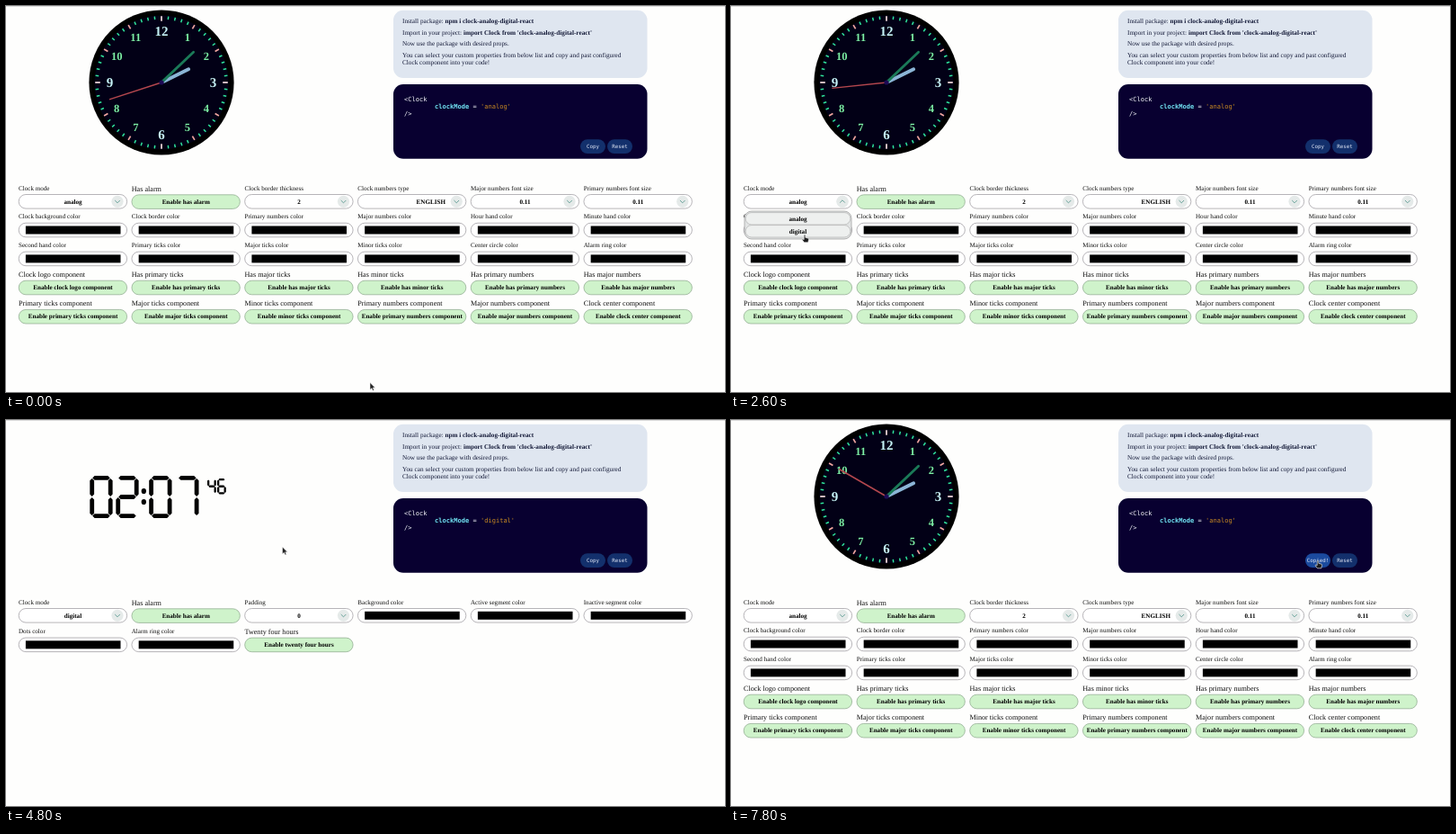
These frames come from a looping animation (800x429 px, 8 s). An HTML page:

```html
<!DOCTYPE html>
<html lang="en">
<head>
<meta charset="utf-8">
<title>Clock playground</title>
<style>
  html, body { margin: 0; width: 100%; height: 100%; overflow: hidden; background: #fefefd; }
  svg { display: block; width: 100vw; height: 100vh; }
  text { font: 7.1px "Liberation Serif", serif; fill: #111; text-rendering: geometricPrecision; white-space: pre; }
  .big { font-size: 8.15px; }
  .bold { font-weight: bold; fill: #000; }
  .mid { text-anchor: middle; }
  .info, .info tspan { font-size: 7.24px; fill: #141a38; }
  .code { font: 7.06px "DejaVu Sans Mono", monospace; fill: #f4f4fa; }
  .key { font-weight: bold; fill: #72e6f5; }
  .str { fill: #cb8b22; }
  .act { font: 5.8px "DejaVu Sans Mono", monospace; fill: #e4eaf8; text-anchor: middle; }
  .major { font-size: 15px; font-weight: bold; fill: #c6f3f6; }
  .minor { font-size: 12.5px; font-weight: bold; fill: #7df0a4; }
</style>
</head>
<body>
<svg id="stage" viewBox="0 0 800 429"></svg>
<script>
const LOOP = 8000, STEP = 200;
const CX = 173, CY = 85;

// ---------- drawing helpers ----------
const rect = (x, y, w, h, r, fill, extra = "") =>
  `<rect x="${x}" y="${y}" width="${w}" height="${h}" rx="${r}" fill="${fill}" ${extra}/>`;
const text = (x, y, cls, content, extra = "") =>
  `<text x="${x}" y="${y}" class="${cls}" ${extra}>${content}</text>`;
const circle = (x, y, r, fill) => `<circle cx="${x}" cy="${y}" r="${r}" fill="${fill}"/>`;
const group = (id, content) => `<g id="${id}">${content}</g>`;
const outline = (color, width = 0.7) => `stroke="${color}" stroke-width="${width}"`;

// ---------- form fields ----------
const colX = col => 14.2 + col * 125.75;

function chevron(x, y, up) {
  const s = up ? -1 : 1;
  return circle(x, y, 6.6, "#e5eae9") +
    `<path d="M${x - 2.8} ${y - 1.3 * s}l2.8 2.8l2.8 -2.8" transform="${up ? `matrix(1 0 0 -1 0 ${2 * y + 2.6})` : ""}" fill="none" ${outline("#5d9b92", 0.9)}/>`;
}

// kind: s = select, b = toggle button, c = colour input
function field(kind, label, value, col, y) {
  const x = colX(col), mid = x + 60.3;
  const pill = rect(x, y - 7.8, 120.4, 15.6, 7.8,
    kind === "b" ? "#cff3cb" : "#fff", outline(kind === "b" ? "#8aa58a" : "#99959b"));
  const caption = kind === "b"
    ? text(x - 0.2, y - 12.1, "big", label)
    : text(x - 0.2, y - 12.6, "", label);
  if (kind === "c") return caption + pill + rect(x + 7.7, y - 4.5, 105.6, 9, 0, "#000");
  const shift = value === "ENGLISH" ? 21 : 0;
  return caption + pill + text(mid + shift, y + 2.2, "bold mid", value) +
    (kind === "s" ? chevron(x + 109.8, y) : "");
}

const select = ([label, value], col, y) => field("s", label, value, col, y);
const colors = (labels, y, from = 0) =>
  labels.split(",").map((name, i) => field("c", name + " color", "", from + i, y)).join("");
const toggles = (labels, y, from = 0) =>
  labels.split(",").map((name, i) =>
    field("b", name, "Enable " + name[0].toLowerCase() + name.slice(1), from + i, y)).join("");

const analogForm =
  select(["Clock mode", "analog"], 0, 217.3) +
  toggles("Has alarm", 217.6, 1) +
  [["Clock border thickness", "2"], ["Clock numbers type", "ENGLISH"],
   ["Major numbers font size", "0.11"], ["Primary numbers font size", "0.11"]]
    .map((f, i) => select(f, i + 2, 217.3)).join("") +
  colors("Clock background,Clock border,Primary numbers,Major numbers,Hour hand,Minute hand", 249) +
  colors("Second hand,Primary ticks,Major ticks,Minor ticks,Center circle,Alarm ring", 280.9) +
  toggles("Clock logo component,Has primary ticks,Has major ticks,Has minor ticks,Has primary numbers,Has major numbers", 313) +
  toggles("Primary ticks component,Major ticks component,Minor ticks component,Primary numbers component,Major numbers component,Clock center component", 345.2);

const digitalForm =
  select(["Clock mode", "digital"], 0, 217.3) +
  toggles("Has alarm", 217.6, 1) +
  select(["Padding", "0"], 2, 217.3) +
  colors("Background,Active segment,Inactive segment", 217.3, 3) +
  colors("Dots,Alarm ring", 249.8) +
  toggles("Twenty four hours", 249.9, 2);

const dropdown =
  chevron(colX(0) + 109.8, 217.3, true) +
  rect(15, 228, 119, 31, 8, "#e2e4e4", outline("#9a9a9a")) +
  ["analog", "digital"].map((name, i) =>
    rect(16.2, 229.6 + 14 * i, 116.6, 13.4, 6.7, "#eef0ef", outline("#a9a9a9", 0.6)) +
    text(74.5, 238.6 + 14 * i, "bold mid", name)).join("");

// ---------- analog clock ----------
function dial() {
  let out = circle(CX, CY, 80.6, "#000") + circle(CX, CY, 74.5, "#020016");
  for (let i = 0; i < 60; i++) {
    const quarter = i % 15 === 0, hour = i % 5 === 0;
    const color = quarter ? "#f6dede" : hour ? "#f2a6a0" : "#2fe39b";
    out += `<path d="M${CX} ${CY - 73.8}v${quarter ? 5.6 : hour ? 5 : 3.6}" transform="rotate(${i * 6} ${CX} ${CY})" ${outline(color, hour ? 1.7 : 1.5)}/>`;
  }
  for (let n = 1; n <= 12; n++) {
    const a = n * Math.PI / 6, major = n % 3 === 0;
    out += text(CX + 57.5 * Math.sin(a), CY - 57.5 * Math.cos(a) + (major ? 5 : 4.2),
      (major ? "major" : "minor") + " mid", n);
  }
  return out;
}
const hand = (id, angle, from, to, color, width, cap) =>
  `<path id="${id}" d="M${CX} ${CY - from}V${CY - to}" transform="rotate(${angle} ${CX} ${CY})" stroke-linecap="${cap}" ${outline(color, width)}/>`;

const analogClock = dial() +
  hand("hour", 63.9, 3, 33.5, "#8bb5d6", 4, "round") +
  hand("minute", 46.6, 2, 49, "#1b7a58", 2.8, "round") +
  hand("second", 252, 0, 61, "#b4474e", 1.5, "butt") +
  circle(CX, CY, 2.6, "#1d0a55");

// ---------- digital clock ----------
const SEGMENTS = ["abcdef", "bc", "abged", "abgcd", "fgbc", "afgcd", "afgedc", "abc", "abcdefg", "abcdfg"];

function digit(n, x, y, w, h, thick) {
  const r = thick / 2, gap = thick * 0.1, l = x + r, m = x + w - r;
  const ys = [y + r, y + h / 2, y + h - r];
  const across = row => [l + gap, ys[row], m - l - 2 * gap, 0];
  const down = (sx, row) => [sx, ys[row] + gap, 0, ys[row + 1] - ys[row] - 2 * gap];
  const shapes = { a: across(0), g: across(1), d: across(2), f: down(l, 0), b: down(m, 0), e: down(l, 1), c: down(m, 1) };
  const d = [...SEGMENTS[n]].map(key => {
    const [sx, sy, dx, dy] = shapes[key];
    return dx
      ? `M${sx} ${sy}l${r} ${-r}h${dx - thick}l${r} ${r}l${-r} ${r}h${thick - dx}z`
      : `M${sx} ${sy}l${r} ${r}v${dy - thick}l${-r} ${r}l${-r} ${-r}v${thick - dy}z`;
  }).join("");
  return `<path d="${d}"/>`;
}
const colon = x => [79, 91].map(y => `<ellipse cx="${x}" cy="${y}" rx="2.7" ry="3.1"/>`).join("");
const seconds = (n, x, y) =>
  digit(Math.floor(n / 10), x, y, 9.8, 17.5, 2.3) + digit(n % 10, x + 11, y, 9.8, 17.5, 2.3);

function digitalClock(sec, booting) {
  if (booting) return colon(145.2) + seconds(sec, 215.8, 76.7);
  const hours = [[0, 93.3], [2, 122.3], [0, 159.2], [7, 189.2]];
  return hours.map(([n, x]) => digit(n, x, 62, 25.3, 47, 4.8)).join("") +
    colon(153.3) + seconds(sec, 224, 65);
}

// ---------- panels ----------
const info =
  rect(431, 4.7, 282.5, 75.3, 11, "#dfe6f0") +
  ["Install package: <tspan class='bold'>npm i clock-analog-digital-react</tspan>",
   "Import in your project: <tspan class='bold'>import Clock from 'clock-analog-digital-react'</tspan>",
   "Now use the package with desired props.",
   "You can select your custom properties from below list and copy and past configured",
   "Clock component into your code!"]
    .map((line, i) => text(441, [19.1, 31.8, 44.4, 57, 65.4][i], "info", line)).join("");

const codePanel =
  rect(431, 87, 282.5, 82.7, 11, "#080030") +
  text(443, 106, "code", "&lt;Clock") +
  text(477, 114, "code", `<tspan class="key">clockMode</tspan> = <tspan class="str" id="mode"></tspan>`) +
  text(443, 122, "code", "/&gt;") +
  rect(639, 148.2, 28, 15.8, 7.9, "#13306c", 'id="copyPill"') +
  rect(669, 148.2, 28, 15.8, 7.9, "#13306c") +
  text(653, 158, "act", "Copy", 'id="copyLabel"') +
  text(683, 158, "act", "Reset");

// ---------- pointers, drawn with the hot spot at 0,0 ----------
const pointers = {
  arrow: `<path d="M0 0V8L1.9 6.3L3.1 9L4.5 8.4L3.3 5.8H5.7Z" fill="#222" ${outline("#fff", 0.5)}/>`,
  hand: `<path d="M-.8 .6Q0 -.6 .8 .6V3.3L4 4.2Q4.7 4.5 4.5 5.5L3.8 8.8H-.6L-3 5.6Q-2.5 4.5 -.8 5.6Z" fill="#1b1b1b" ${outline("#fff", 0.6)}/>`,
  beam: `<path d="M-1.7 -4Q0 -4 0 -3Q0 -4 1.7 -4M0 -3V3M-1.7 4Q0 4 0 3Q0 4 1.7 4" fill="none" ${outline("#333", 0.8)}/>`
};

document.getElementById("stage").innerHTML =
  rect(0, 0, 800, 1, 0, "#dcdcdc") + info + codePanel +
  group("analog", analogClock + analogForm) +
  group("digital", group("readout", "") + digitalForm) +
  group("menu", dropdown) +
  group("cursor", Object.entries(pointers).map(([id, shape]) => group(id, shape)).join(""));

// ---------- timeline ----------
const CURSOR = [ // time, x, y, pointer
  [0, 405, 418.5, "arrow"], [200, 402, 412, "arrow"], [500, 335, 270, "arrow"],
  [800, 266, 158.5, "arrow"], [1200, 150, 190, "arrow"], [1600, 84, 216, "hand"],
  [2000, 82, 220, "hand"], [2400, 82, 248, "hand"], [2600, 82, 254, "hand"],
  [3200, 82, 254, "hand"], [3600, 140, 225, "arrow"], [4400, 307.5, 141, "arrow"],
  [4800, 307.5, 141, "arrow"], [5400, 82, 216, "hand"], [5700, 80, 220, "hand"],
  [6000, 77, 236, "hand"], [6200, 77, 236, "beam"], [6400, 78, 232.5, "beam"],
  [6600, 110, 222, "arrow"], [7000, 480, 180, "arrow"], [7400, 653, 156, "hand"], [LOOP, 653, 156, "hand"]
];
const SECONDS = [[0, 42], [800, 42.2], [1000, 43], [2000, 44], [2800, 45], [3800, 46],
  [5000, 47], [5600, 48], [6200, 49], [7200, 50]];

const within = (t, from, to) => t >= from && t < to;
const latest = (table, t) => table.filter(row => row[0] <= t).pop();
const el = id => document.getElementById(id);
const show = (id, on) => { el(id).style.display = on ? "" : "none"; };

function render(t) {
  const digital = within(t, 2800, 6200), copied = t >= 7600;
  const sec = latest(SECONDS, t)[1];

  show("analog", !digital);
  show("digital", digital);
  show("menu", within(t, 1800, 2800) || within(t, 5600, 6200));
  el("mode").textContent = digital ? "'digital'" : "'analog'";
  el("second").setAttribute("transform", `rotate(${sec * 6} ${CX} ${CY})`);
  el("readout").innerHTML = digital ? digitalClock(sec, t < 3000) : "";
  el("copyLabel").textContent = copied ? "Copied!" : "Copy";
  el("copyPill").setAttribute("fill", t >= 7400 ? "#1b4a9e" : "#13306c");

  const from = latest(CURSOR, t), to = CURSOR[CURSOR.indexOf(from) + 1] || from;
  const k = to === from ? 0 : (t - from[0]) / (to[0] - from[0]);
  const x = from[1] + (to[1] - from[1]) * k, y = from[2] + (to[2] - from[2]) * k;
  el("cursor").setAttribute("transform", `translate(${x} ${y})`);
  for (const id in pointers) show(id, id === from[3]);
}

const start = performance.now();
let shown = -1;
function tick() {
  const t = Math.floor((performance.now() - start) % LOOP / STEP) * STEP;
  if (t !== shown) render(shown = t);
  requestAnimationFrame(tick);
}
tick();
</script>
</body>
</html>
```
